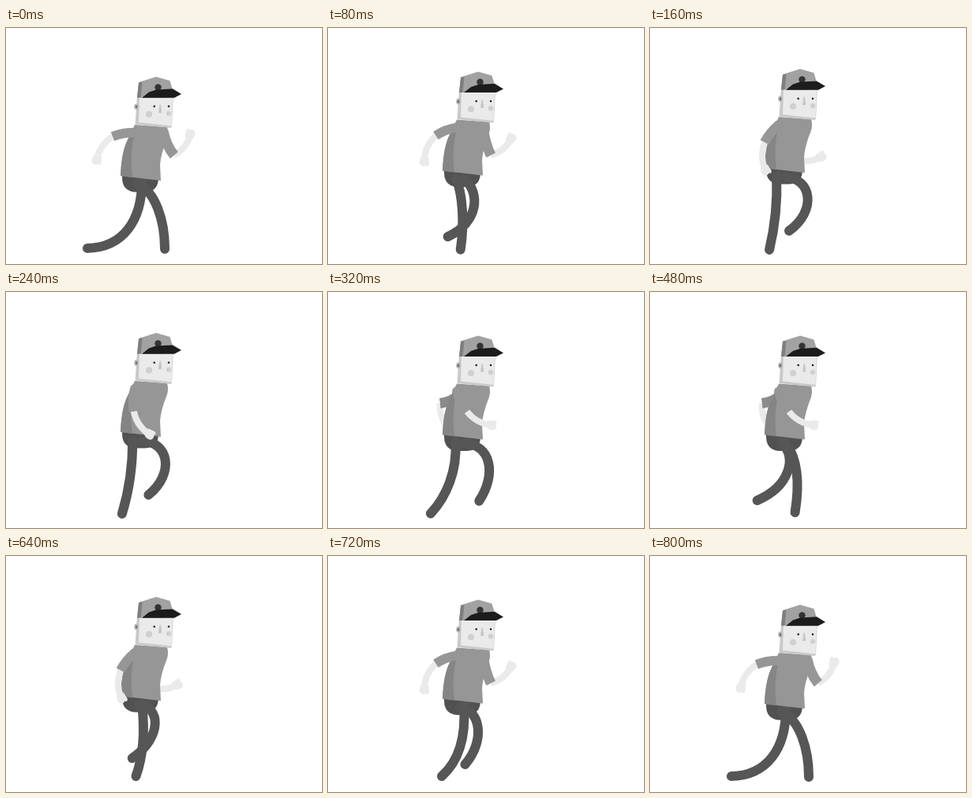
These frames come from a looping animation (400x300 px, 840 ms). An HTML page with a canvas:

```html
<!DOCTYPE html>
<html lang="en">
<head>
<meta charset="utf-8">
<title>Walking man</title>
<style>
html, body { margin: 0; width: 100%; height: 100%; overflow: hidden; background: #fff; }
canvas { display: block; width: 400px; height: 300px; }
</style>
</head>
<body>
<canvas id="stage" width="400" height="300"></canvas>
<script>
const ctx = document.getElementById('stage').getContext('2d');
const LOOP = 840, STRIDE = 800, STEP = 40, LIFT = 10.3;
const SKIN = '#eaeaea', SHIRT = '#969696', SHADE = '#858585', LEG = '#565656', HIP = '#515151';

// Leg curves: start, two controls, foot. Stride order: back, swing, front, stance.
const NEAR_LEG = [
  [172, 195, 172, 245, 148, 279, 103, 280],
  [172, 189, 206, 190, 214, 230, 179, 257],
  [172, 199, 208, 200, 213, 235, 213, 281],
  [172, 188, 176, 220, 176, 250, 167, 280]
];
const FAR_LEG = [
  [164, 195, 170, 249, 138, 278, 96, 281],
  [168, 189, 196, 190, 198, 230, 158, 256],
  [166, 198, 189, 207, 201, 245, 201, 281],
  [160, 188, 160, 215, 157, 250, 149, 282]
];

const lerp = (a, b, k) => a + (b - a) * k;
const rad = deg => deg * Math.PI / 180;
// Point at a distance from p; the angle is 0 downwards and grows to the right.
const reach = (p, a, len, side = 0) => [
  p[0] + Math.sin(a) * len - Math.cos(a) * side,
  p[1] + Math.cos(a) * len + Math.sin(a) * side
];

function fill(color, d) {
  ctx.fillStyle = color;
  ctx.fill(new Path2D(d));
}

function oval(color, x, y, rx, ry = rx, turn = 0) {
  ctx.fillStyle = color;
  ctx.beginPath();
  ctx.ellipse(x, y, rx, ry, turn, 0, Math.PI * 2);
  ctx.fill();
}

function bend(color, width, from, ctrl, to) {
  ctx.strokeStyle = color;
  ctx.lineWidth = width;
  ctx.lineCap = 'butt';
  ctx.beginPath();
  ctx.moveTo(...from);
  ctx.quadraticCurveTo(...ctrl, ...to);
  ctx.stroke();
}

function leg(poses, phase) {
  const half = STRIDE / 4;
  const i = Math.floor(phase / half), x = phase / half - i;
  const k = i % 2 ? x * x : 1 - (1 - x) ** 2;
  const p = poses[i].map((v, n) => lerp(v, poses[(i + 1) % 4][n], k));
  ctx.strokeStyle = LEG;
  ctx.lineWidth = 12;
  ctx.lineCap = 'round';
  ctx.beginPath();
  ctx.moveTo(p[0], p[1]);
  ctx.bezierCurveTo(...p.slice(2));
  ctx.stroke();
}

function forearm(elbow, a, len) {
  const hand = reach(elbow, a, len);
  bend(SKIN, 8, elbow, reach(elbow, a, len * 0.5, 7), hand);
  oval(SKIN, ...hand, 7.5, 5.7, Math.PI / 2 - a);
  oval(SKIN, ...reach(hand, a, 1, -5), 4, 2.4, Math.PI / 2 - a - 0.5);
}

function farArm(k) {
  const pivot = [181, 136], a = rad(lerp(51, -86, k));
  const elbow = reach(pivot, a, 41);
  forearm(elbow, rad(lerp(142, 6, k)), 33);
  const start = [lerp(199, 165, k), lerp(131, 136, k)];
  bend(lerp(0, 1, k) < 0.5 ? SHIRT : '#8b8b8b', 13, start, reach(pivot, a + 0.11, 26), elbow);
}

function nearArm(k) {
  const shoulder = [163, 133], a = rad(lerp(-80, 38, k));
  const elbow = reach(shoulder, a, 28.5);
  forearm(elbow, rad(lerp(-35, 70, k)), 35);
  bend(SHIRT, 12, shoulder, reach(shoulder, a, 14, 3), elbow);
  oval(SHIRT, ...shoulder, 6);
}

function torso() {
  fill(SHIRT, 'M163 123L204 126Q206 133 204 140Q196 160 195 174L196 194L145 188Q146 158 154 142Z');
  fill(SHADE, 'M159 132L163 134Q156 160 160 190L145 188Q146 158 154 142Z');
}

function head() {
  fill('#c9c9c9', 'M166 86H170L210 124L209 127L163.500 122.500Z');
  fill('#d2d2d2', 'M205 86H212L210 126L205 124Z');
  fill(SKIN, 'M169 86H211L209.500 124.500L168 120Z');
  oval('#b5b5b5', 165, 100, 2.8, 3.8);
  oval('#666', 165, 100, 1.2, 1.6);
  oval('#222', 187.7, 99.6, 1.3);
  oval('#222', 206, 99.6, 1.3);
  fill('#c6c6c6', 'M194.500 97.500H195.800L197.300 107.500Q195 109 193 107.500Z');
  oval('#d0d0d0', 181, 109.6, 4.1);
  oval('#d0d0d0', 206, 108.6, 3.2);
  fill('#a2a2a2', 'M168 69L190 62L207.500 67L211 79L200 88.500H166Z');
  fill('#7e7e7e', 'M168 69.500L172.500 68.500L170.500 88.500H166Z');
  oval('#333', 192.5, 75.4, 4.2);
  fill('#1c1c1c', 'M172 88.700L181 81.500L190 78.500L211 77.300L222 84L213 88.700Z');
}

function draw(t) {
  const phase = t % STRIDE;
  const u = (phase % 400 - 200) / 200;
  const bob = -LIFT * (1 - u * u);
  const swing = (1 - Math.cos(phase / STRIDE * Math.PI * 2)) / 2;
  const raised = part => {
    ctx.save();
    ctx.translate(0, bob);
    part();
    ctx.restore();
  };

  ctx.fillStyle = '#fff';
  ctx.fillRect(0, 0, 400, 300);
  raised(() => {
    farArm(swing);
    fill(HIP, 'M147 186L193 190Q193 208 176 208.500H163Q147 207 147 190Z');
  });
  leg(FAR_LEG, (phase + STRIDE / 2) % STRIDE);
  leg(NEAR_LEG, phase);
  raised(() => {
    torso();
    nearArm(swing);
    head();
  });
}

function tick() {
  const t = performance.now() % LOOP;
  draw(Math.floor(t / STEP) * STEP);
  requestAnimationFrame(tick);
}
tick();
</script>
</body>
</html>
```
